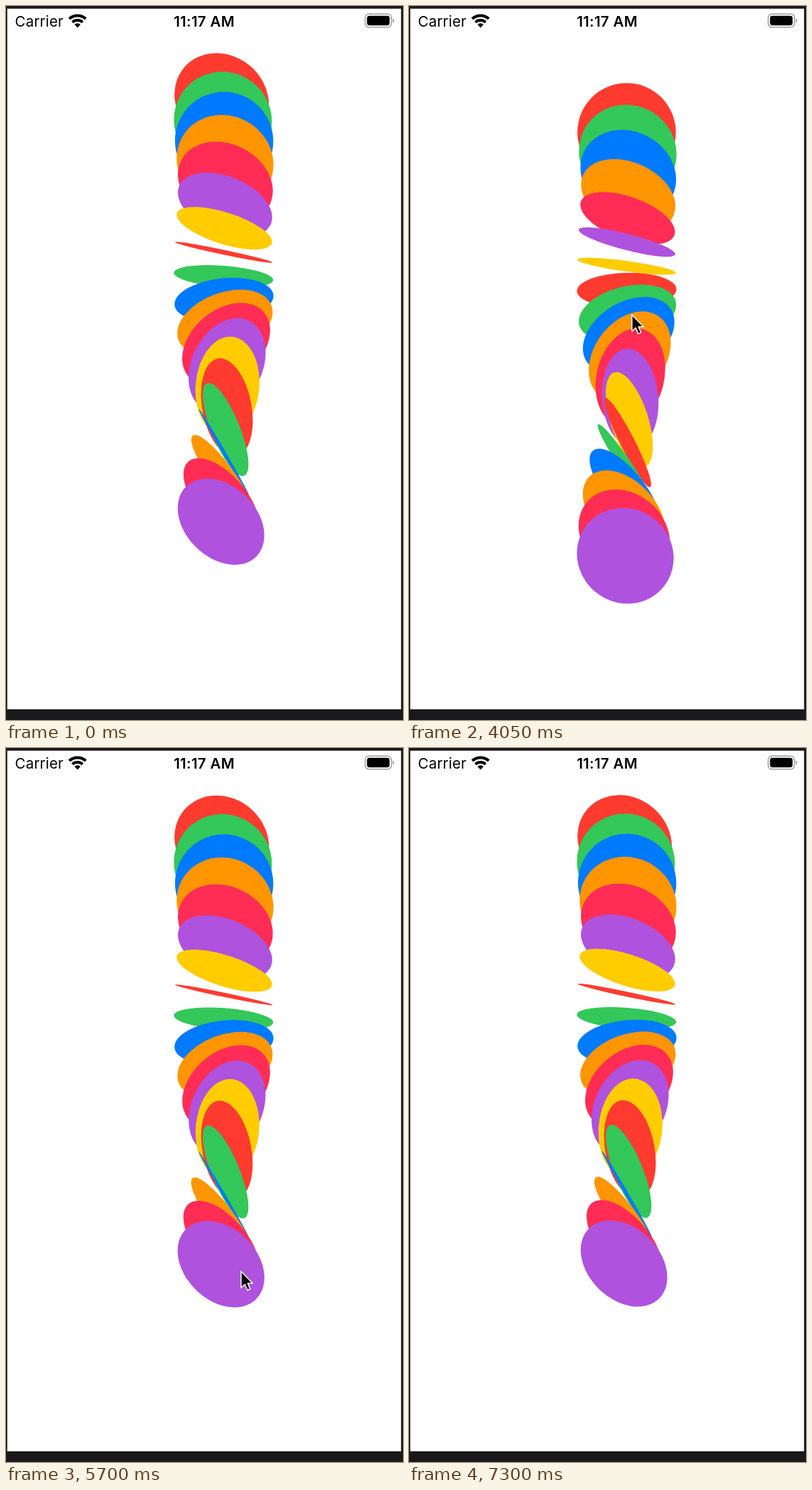
These frames come from a looping animation (559x1003 px, 7.6 s). An HTML page:

```html
<!DOCTYPE html>
<html lang="en">
<head>
<meta charset="utf-8">
<title>Spinning discs</title>
<style>
  html, body { margin: 0; width: 100%; height: 100%; overflow: hidden; background: #19181a; }
  svg { display: block; width: 100vw; height: 100vh; }
  text { font-family: Inter, "Liberation Sans", sans-serif; font-size: 20.5px; fill: #000; }
</style>
</head>
<body>
<svg viewBox="0 0 559 1003">
  <rect x="1.5" y="3.5" width="555" height="984.5" fill="#fff"/>
  <g id="discs"></g>
  <text x="12.5" y="28.8" letter-spacing=".2">Carrier</text>
  <g id="wifi" fill="none" stroke="#000"></g>
  <text x="279" y="28.8" text-anchor="middle" font-weight="600" letter-spacing=".3">11:17 AM</text>
  <rect x="505.7" y="11.2" width="37" height="18.6" rx="5.5" fill="none" stroke="#a0a0a0" stroke-width="1.5"/>
  <rect x="508.3" y="13.8" width="31.8" height="13.4" rx="3.4"/>
  <path d="M544.6 17.2q2 1 2 3.3t-2 3.3z" fill="#a0a0a0"/>
  <path id="pointer" d="M0 0V23.2L5.3 18.3L8.9 26.7L12.8 25L9.3 16.9H16.3Z"
    stroke="#fff" stroke-width="1.5" stroke-linejoin="round"/>
  <path d="M0 0H559V1003H0ZM1.5 3.5V988H556.5V3.5Z" fill="#19181a" fill-rule="evenodd"/>
</svg>
<script>
const NS = 'http://www.w3.org/2000/svg';
const LOOP = 7600, STEP = 50;
const COLORS = ['#ff3b30', '#34c759', '#007aff', '#ff9500', '#ff2d55', '#af52de', '#ffcc00'];
const COUNT = 20, GAP = 31.18, REST = 128.2;
const CX = 306.5, R = 69.3, EYE = 450;
const RAD = Math.PI / 180;
// Rotation axis: depth part, flat part and direction of the flat part
const AZ = 0.379, AF = Math.sqrt(1 - AZ * AZ), TILT = 34.8;
const MID = 491.5, TURN = 0.576;

function add(parent, tag, attrs) {
  const el = document.createElementNS(NS, tag);
  set(el, attrs);
  parent.appendChild(el);
  return el;
}

function set(el, attrs) {
  for (const k in attrs) el.setAttribute(k, attrs[k]);
}

// Smooth curve through [time, value] keys that never overshoots
function track(keys, t) {
  const n = keys.length - 1;
  if (t <= keys[0][0]) return keys[0][1];
  if (t >= keys[n][0]) return keys[n][1];
  const slope = i => (keys[i + 1][1] - keys[i][1]) / (keys[i + 1][0] - keys[i][0]);
  const tangent = i => {
    if (i === 0 || i === n) return 0;
    const a = slope(i - 1), b = slope(i);
    return a * b > 0 ? 2 * a * b / (a + b) : 0;
  };
  let i = 0;
  while (t > keys[i + 1][0]) i++;
  const [t0, v0] = keys[i], [t1, v1] = keys[i + 1];
  const h = t1 - t0, u = (t - t0) / h, w = 1 - u;
  return v0 * (1 + 2 * u) * w * w + v1 * (3 - 2 * u) * u * u
    + h * u * w * (tangent(i) * w - tangent(i + 1) * u);
}

// Critically damped return to rest
function spring(from, ms, omega) {
  const x = omega * ms / 1000;
  return REST + (from - REST) * (1 + x) * Math.exp(-x);
}

const DRAG_1 = [[3600, REST], [3850, 231], [4000, 193], [4480, 45], [4800, 130], [5050, 214], [5160, 274]];
const DRAG_2 = [[5900, REST], [6480, -121.8]];

function scrollAt(t) {
  if (t < 5160) return track(DRAG_1, t);
  if (t < 5900) return spring(274, t - 5160, 14);
  if (t < 6480) return track(DRAG_2, t);
  return spring(-121.8, t - 6480, 12);
}

const POINTER_X = [[3200, 492], [3550, 314], [3850, 315], [4500, 310], [5050, 326], [5600, 331], [5900, 331], [6450, 338]];
const POINTER_Y = [[3200, 664], [3550, 249], [3640, 330], [3850, 545], [4000, 465], [4500, 164],
  [4800, 350], [5050, 543.5], [5170, 690], [5600, 735], [5900, 735], [6450, 205]];

// A disc turned in space, seen in perspective, is an ellipse along its flat normal
function placeDisc(el, y) {
  const turn = (180 + (y - MID) * TURN) * RAD;
  const c = Math.cos(turn), s = Math.sin(turn);
  const nz = c + AZ * AZ * (1 - c);
  const along = AZ * (1 - c);
  const flat = AF * Math.hypot(s, along);
  const dir = TILT + Math.atan2(s, along) / RAD;
  const q = R * flat / EYE, p = 1 - q * q;
  let long = R / Math.sqrt(p), short = Math.abs(nz) * R / p;
  if (short < 0.5) {
    long *= 1.18;
    short = 0.35;
  }
  set(el, {
    cx: -nz * R * q / p, rx: short, ry: long,
    transform: `translate(${CX} ${y}) rotate(${dir})`
  });
}

const layer = document.getElementById('discs');
const discs = Array.from({ length: COUNT }, (_, i) =>
  add(layer, 'ellipse', { fill: COLORS[i % COLORS.length] }));
const pointer = document.getElementById('pointer');

const wifi = document.getElementById('wifi');
for (const [r, w] of [[17, 4], [10.5, 3.8], [3.1, 6.2]]) {
  const x = r * Math.sin(43 * RAD), y = 30.5 - r * Math.cos(43 * RAD);
  add(wifi, 'path', { d: `M${100.7 - x} ${y}A${r} ${r} 0 0 1 ${100.7 + x} ${y}`, 'stroke-width': w });
}

function draw(ms) {
  const t = Math.floor(ms % LOOP / STEP) * STEP;
  const top = scrollAt(t);
  discs.forEach((el, i) => placeDisc(el, top + i * GAP));
  set(pointer, {
    transform: `translate(${track(POINTER_X, t)} ${track(POINTER_Y, t)})`,
    visibility: t >= 3050 && t < 7300 ? 'visible' : 'hidden'
  });
}

const start = performance.now();
function tick() {
  draw(performance.now() - start);
  requestAnimationFrame(tick);
}
tick();
</script>
</body>
</html>
```
